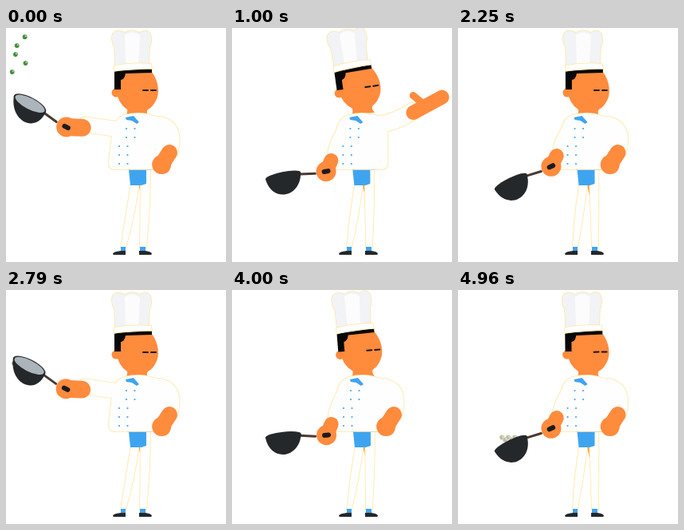
An HTML page with a canvas for the animation above (5000 ms loop, 276 px wide and 293 px high).

```html
<!DOCTYPE html>
<html lang="en">
<head>
<meta charset="utf-8">
<title>Chef tossing food</title>
<style>
html, body { margin: 0; width: 100%; height: 100%; overflow: hidden; background: #fff; }
canvas { display: block; }
</style>
</head>
<body>
<canvas id="stage" width="276" height="293"></canvas>
<script>
const ctx = document.getElementById('stage').getContext('2d');
const LOOP = 5000, TOSS = 2250, CYCLE = 3160;
const SKIN = '#ff8b3d', BLUE = '#3fa4f0', DARK = '#25282a', EDGE = '#ffe6a0', CLOTH = '#fefefe';

const mix = (a, b, k) => a + (b - a) * k;
const bump = (t, mid, width) => Math.exp(-(((t - mid) / width) ** 2));
const radians = degrees => degrees * Math.PI / 180;
function ease(t, from, to) {
  const k = Math.min(1, Math.max(0, (t - from) / (to - from)));
  return k * k * (3 - 2 * k);
}

function fill(d, color) {
  ctx.fillStyle = color;
  ctx.fill(new Path2D(d));
}
function stroke(d, width, color) {
  ctx.strokeStyle = color;
  ctx.lineWidth = width;
  ctx.stroke(new Path2D(d));
}
function oval(x, y, rx, ry, color) {
  ctx.fillStyle = color;
  ctx.beginPath();
  ctx.ellipse(x, y, rx, ry, 0, 0, 7);
  ctx.fill();
}
const dot = (x, y, r, color) => oval(x, y, r, r, color);

// Shapes are [path, width]; all edges go first so the pieces merge
function cloth(...shapes) {
  for (const [d, w = 0] of shapes) stroke(d, w + 1.6, EDGE);
  for (const [d, w] of shapes) w ? stroke(d, w, CLOTH) : fill(d, CLOTH);
}
function group(x, y, degrees, draw) {
  ctx.save();
  ctx.translate(x, y);
  ctx.rotate(radians(degrees));
  draw();
  ctx.restore();
}

function legs(bx) {
  const l = 157 + bx, r = 183 + bx;
  fill(`M${l + 9} 195H${l + 16}L${l + 13} 212Z`, '#ff9a35');
  cloth(
    [`M${l} 194Q${l - 7} 235 144 275H150Q${l + 5} 235 ${l + 10} 194Z`],
    [`M${r - 14} 178L168 275H176Q${r - 2} 225 ${r - 2} 178Z`]
  );
  fill('M144 274H150V280H144ZM168 274H175V280H168Z', BLUE);
  fill('M134 283Q134 280 144 279H150V284H135ZM167 279H175Q183 280 183 283L182 284H167Z', DARK);
  fill(`M${l - 3} 177H${l + 19}V195L${l + 13} 197H${l - 1}Z`, BLUE);
  stroke(`M${l - 4} 177H${l + 27}`, 1.5, BLUE);
}

function head(x, y, tilt) {
  group(165 + x, 105 + y, tilt, () => {
    ctx.translate(-165, -105);
    fill('M140 54H183C192 66 193 82 188 90Q184 98 178 101Q175 104 179 110H150Q153 104 152 101Q140 93 139 78Z', SKIN);
    dot(138, 80, 5.5, SKIN);
    fill('M136 53L183 50V55L150 56Q149 63 144 64V76L136 76Z', '#080808');
    stroke('M172 77H178M182 77H188', 2, '#171717');
    const crown = 'M137 46L136 23Q131 14 134 6Q140 -1 149 5Q158 -1 168 5Q176 -1 181 6Q184 16 180 23L179 45Z';
    stroke(crown, 1.6, EDGE);
    fill(crown, '#f1f3f6');
    fill('M149 8Q158 1 168 8L166 46H150Z', '#fcfcfc');
    cloth(['M136 46Q158 42 182 44L183 50Q158 49 136 53Z']);
  });
}

function shirt(bx, sleeves) {
  group(bx, 0, 0, () => {
    cloth(
      ['M148 109Q137 113 134 126L129 165Q127 177 137 177H191Q199 177 198 166V126Q196 111 178 108Q165 105 148 109Z'],
      ...sleeves
    );
    fill('M150 112L160 110L167 118L164 120L158 116L151 115Z', BLUE);
    for (let row = 0; row < 5; row++) {
      const x = row < 2 ? 151 : 142, y = 126 + row * 11;
      dot(x, y, 1.1, BLUE);
      dot(x + 10.5, y, 1.1, BLUE);
    }
  });
}

function bowl(lift) {
  const open = mix(5, 8, lift), skew = 7 * lift;
  fill(`M-22.5 0C${skew - 20} 31 ${skew + 17} 31 22.5 0Z`, DARK);
  oval(0, 0, 22.5, open, DARK);
  ctx.globalAlpha = lift;
  oval(0, 0, 20.5, open - 1, '#acb5bc');
  ctx.globalAlpha = 1;
}

function food(u, panX, panY) {
  const hop = bump(u, 1800, 150);
  const flight = ease(u, -450, -250) - ease(u, 660, 860);
  const green = bump(u, 0, 100);
  const color = `rgb(${75 - 15 * green},${125 + 18 * green},${150 - 75 * green})`;
  for (let i = 0; i < 5; i++) {
    const airX = 16 + 0.035 * u + 9 * Math.sin(i * 2.4 + 1 + u / 200);
    const airY = 20 + 0.00025 * (u - 230) ** 2 + (i - 2) * (11 - 0.009 * u);
    const x = mix(panX + i * 4 - 11, airX, flight);
    const y = mix(panY + 3 + (i % 2) * 3 - 11 * hop, airY, flight);
    dot(x, y, 3.4, '#fff0bd');
    dot(x, y, 2.8, flight > 0 ? color : '#b9b9b0');
    dot(x + 1, y - 1, 0.9, '#dfe9df');
  }
}

function draw(t) {
  // Time within the toss: the pan is highest near zero
  const u = t < TOSS ? t : t - CYCLE;
  const lift = ease(u, -850, -350) - ease(u, 600, 840);
  const pull = ease(u, -100, 700);
  const sag = 1 - ease(u, -400, 0) + ease(u, 800, 1400);
  const bx = -(1 - lift) * (2 + 2.5 * sag);
  const tilt = -10 * bump(u, 1180, 380);

  // Pan arm, swinging from the shoulder
  const armAngle = radians(mix(114 + 3 * sag, 183 - 12 * pull, lift));
  const reach = mix(60 - 8 * sag, 70 - 14 * pull, lift);
  const panAngle = mix(-6 - 20 * sag, 27 + 8 * pull, lift);
  const dx = Math.cos(armAngle), dy = Math.sin(armAngle);
  const gx = 145 + reach * dx, gy = 127 + reach * dy;
  const wrist = reach - mix(15, 20, lift);
  const wx = 145 + wrist * dx, wy = 127 + wrist * dy;

  // Free arm, from the hip to an open wave
  const out = ease(t, 20, 300) - ease(t, 1800, 2200);
  const raise = bump(t, 630, 160);
  const handX = mix(205, 230 - 4 * raise, out), handY = mix(156, 106 - 4 * raise, out);
  const handAngle = mix(123, -28 - 37 * raise, out), handLength = mix(18, 41, out);

  ctx.fillStyle = '#fff';
  ctx.fillRect(0, 0, 276, 293);
  ctx.lineCap = ctx.lineJoin = 'round';

  legs(bx);
  head(bx / 4, 1 + tilt * 0.4, tilt);
  shirt(bx, [
    [`M145 127Q${(145 + wx) / 2 - 2} ${(127 + wy) / 2 - 2} ${wx + 4} ${wy - 4}`, 19],
    [`M186 121Q${mix(214, 208, out)} ${mix(121, 118, out)} ${handX} ${handY - 2}`, 21]
  ]);

  group(handX + bx, handY, handAngle, () => {
    const thumb = out * (1 - raise);
    stroke(`M0 0H${handLength}`, mix(20, 18, out), SKIN);
    dot(handLength, 0, mix(12, 8.5, out), SKIN);
    stroke(`M${18 * out} 0l${-8 * thumb} ${-19 * thumb}`, 9, SKIN);
  });

  const px = gx + bx, a = radians(panAngle), c = Math.cos(a), s = Math.sin(a);
  food(u, px - 54 * c + 5 * s, gy - 54 * s - 5 * c);
  group(px, gy, panAngle, () => {
    stroke('M-33 -3L-14 0', 3, '#493a33');
    group(-54, -5, 0, () => bowl(lift));
  });
  dot(px, gy, 12.5, SKIN);
  stroke(`M${px} ${gy}L${wx + bx} ${wy}`, mix(18, 22, lift), SKIN);
  group(px, gy, panAngle, () => stroke('M-2.5 0H2.5', 6, '#1c1c1c'));
}

const start = performance.now();
function tick() {
  draw((performance.now() - start) % LOOP);
  requestAnimationFrame(tick);
}
tick();
</script>
</body>
</html>
```
